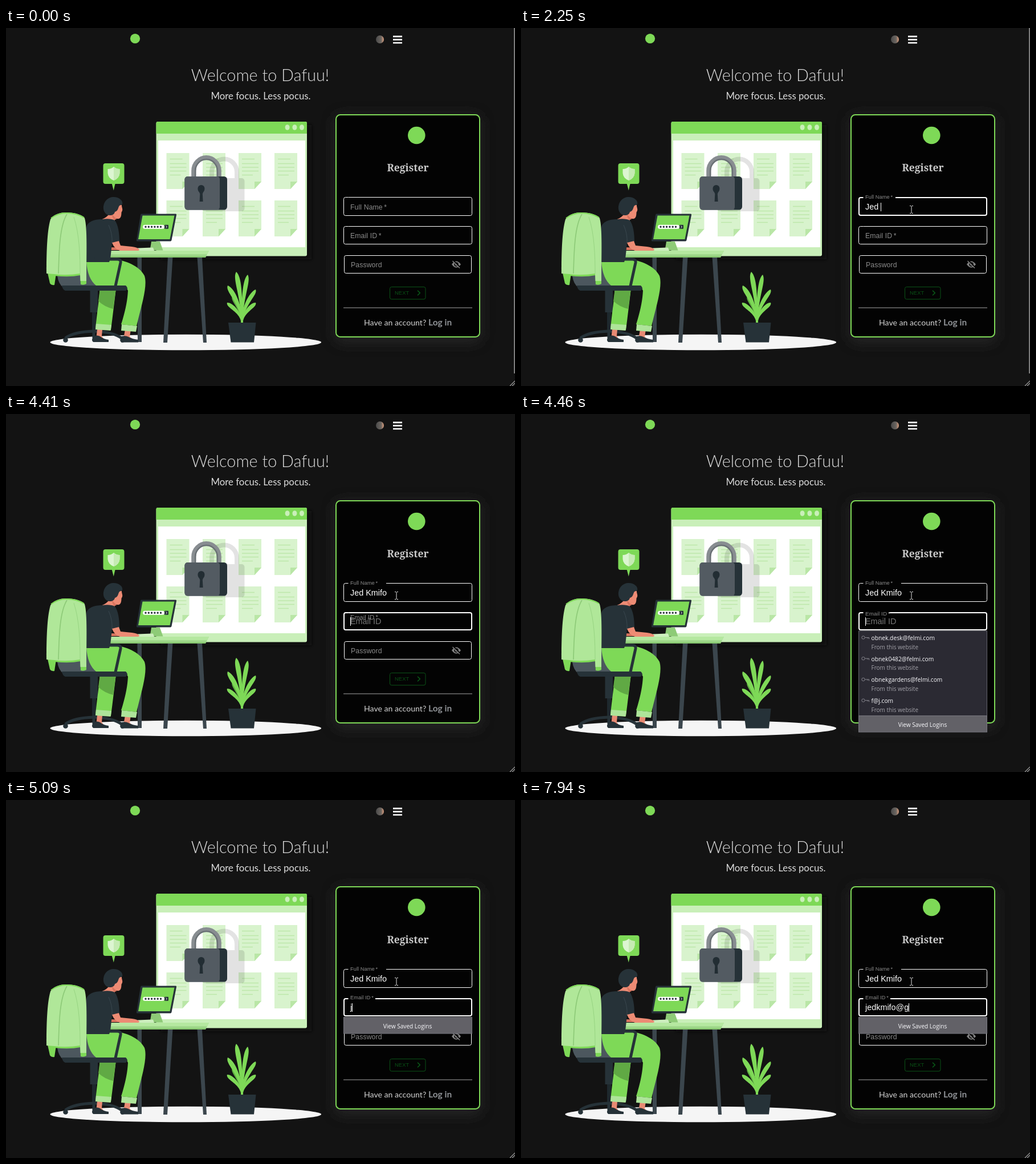
An HTML page that plays this animation: 893 px wide and 627 px high, repeating every 8 s.

```html
<!DOCTYPE html>
<html lang="en">
<head>
<meta charset="utf-8">
<title>Register</title>
<style>
html, body { margin: 0; width: 100%; height: 100%; overflow: hidden; background: #131313; }
svg { display: block; }
text { white-space: pre; }
.lato { font-family: Lato, sans-serif; }
.ui { font-family: "Open Sans", "Noto Sans", sans-serif; }
.arial { font-family: "Liberation Sans", Arial, sans-serif; }
.label { font-size: 12.24px; letter-spacing: .115px; fill: #8c8c8c; }
.typed { font-size: 14.4px; fill: #fff; }
</style>
</head>
<body>
<svg width="893" height="627" viewBox="0 0 893 627" xmlns="http://www.w3.org/2000/svg">
<defs>
  <linearGradient id="moon">
    <stop offset="0" stop-color="#4a4a4a"/><stop offset=".65" stop-color="#6b6661"/><stop offset="1" stop-color="#e0a080"/>
  </linearGradient>
  <filter id="glow" x="-20%" y="-20%" width="140%" height="140%"><feGaussianBlur stdDeviation="11"/></filter>
  <filter id="soft" x="-10%" y="-10%" width="120%" height="120%"><feGaussianBlur stdDeviation="3"/></filter>
</defs>
<rect width="893" height="627" fill="#131313"/>

<!-- header -->
<circle cx="226.5" cy="18.5" r="8.6" fill="#7ed957"/>
<circle cx="656" cy="20" r="7" fill="url(#moon)"/>
<path d="M679 14.800h16M679 20.400h16M679 26h16" stroke="#fff" stroke-width="2.7"/>
<g class="lato" text-anchor="middle" fill="#dcdcdc">
  <text x="446" y="93" font-size="28.8" font-weight="300">Welcome to Dafuu!</text>
  <text x="447" y="124.5" font-size="16.8">More focus. Less pocus.</text>
</g>

<ellipse cx="315.3" cy="550.5" rx="237.8" ry="13.8" fill="#f5f5f5"/>

<!-- browser window -->
<rect x="272" y="170" width="264" height="235" fill="#080808" filter="url(#soft)"/>
<rect x="263.5" y="164" width="264.5" height="235.5" rx="3" fill="#c9efb9"/>
<path d="M263.5 185v-18q0-3 3-3h258.500q3 0 3 3v18z" fill="#7ed957"/>
<g fill="#c9efb9">
  <ellipse cx="493.6" cy="174" rx="4" ry="4.8"/><ellipse cx="506.4" cy="174" rx="4" ry="4.8"/><ellipse cx="519" cy="174" rx="4" ry="4.8"/>
</g>
<rect x="267" y="197" width="258" height="187" fill="#fff"/>
<g id="docs"></g>

<!-- padlock -->
<g opacity=".11">
  <path d="M361 263V252A21.500 22 0 0 1 405 252V263" fill="none" stroke="#000" stroke-width="8"/>
  <rect x="344" y="263" width="74.500" height="58" rx="5"/>
</g>
<path d="M329.200 261V250A22.300 23 0 0 1 373.800 250V261" fill="none" stroke="#888d91" stroke-width="8"/>
<path d="M332.200 261V250A19.300 20 0 0 1 370.800 250V261" fill="none" stroke="#6a7175" stroke-width="2.500"/>
<rect x="313.500" y="260" width="74.500" height="58.500" rx="5.500" fill="#263238"/>
<path d="M319 260H370q5 0 5 5v48q0 5.500-5 5.500H319q-5.500 0-5.500-5.500v-47.500q0-5.500 5.500-5.500z" fill="#535b62"/>
<path d="M342.500 275c7 0 7.500 9 3.500 12.500l-1.200 3 .8 13.500h-6l.7-13.500-1.300-3c-4-3.500-3.500-12.500 3.500-12.500z" fill="#222d33"/>

<!-- shield bubble -->
<path d="M174.500 237h29q4 0 4 4v28q0 4-4 4h-12l-2.700 11.500-3-11.500h-11.300q-4 0-4-4v-28q0-4 4-4z" fill="#7ed957"/>
<path d="M189 243q4.500 4 10.500 4v7q-.5 9-10.500 13q-10-4-10.500-13v-7q6 0 10.500-4z" fill="#dcf5d1"/>
<path d="M189 243q4.500 4 10.500 4v7q-.5 9-10.500 13z" fill="#c5ebb3"/>

<!-- plant -->
<g id="plant"></g>
<path d="M390 516h48.500l-3.500 34.500h-40.500z" fill="#263238"/>

<!-- desk -->
<g fill="#3b464d">
  <path d="M230.500 400h7.500v150h-7z"/>
  <path d="M284 401h8.500L283 551h-7z"/>
  <path d="M335.500 401h8.500l8 150h-6z"/>
</g>
<path d="M150 390h206l-6 12H150z" fill="#a0d98b"/>
<path d="M150 390h206l-3 6H150z" fill="#b5e8a0"/>
<path d="M150 399.500h201l-1 2.500H150z" fill="#88c871"/>
<path d="M255 374h15l5.500 15.500h-23z" fill="#8ecb77"/>
<path d="M231 385.500l27-1 2 5.500h-32z" fill="#cdeebe"/>
<path d="M237.500 325.500h60q2 0 1.500 2l-8.500 44q-.5 2-2 2h-58q-2 0-1.500-2l7-44q.5-2 1.500-2z" fill="#263238"/>
<path d="M239.500 328.500h56l-8 41.500h-55.500z" fill="#7ed957"/>
<path d="M243.500 348.300h31" stroke="#fff" stroke-width="7" stroke-linecap="round"/>
<path d="M245 348.300h28" stroke="#263238" stroke-width="3.400" stroke-linecap="round" stroke-dasharray="0 5.300"/>
<rect x="278" y="344.800" width="7" height="7" rx="1" fill="#263238"/>
<path d="M280.500 346.500l2 1.800-2 1.800" fill="none" stroke="#fff" stroke-width=".9"/>

<!-- chair base -->
<path d="M147.500 460h13.500v38h-13.500z" fill="#263238"/>
<path d="M151 498h7v34h-7z" fill="#1e282d"/>
<path d="M104 543q16-11 50-12q34 1 50 13M154 531v12" fill="none" stroke="#263238" stroke-width="5"/>
<g fill="#263238"><circle cx="104.500" cy="546.500" r="4.300"/><circle cx="204.500" cy="546.500" r="4.300"/><circle cx="155" cy="546" r="4"/></g>

<!-- legs -->
<path d="M160 528h9l-1 12 4 5h-14z" fill="#e88a73"/>
<path d="M153 540q7-3 12 0q6 5 15 6v4h-27z" fill="#263238"/>
<path d="M165 456h28c-3 25-6 50-9 73l-27-2c2-24 6-48 8-71z" fill="#7ed957"/>
<path d="M165 456h28l-5 36q-16-4-26-14z" fill="#60a944"/>
<path d="M158 518l27 2-1.500 10-26.500-2z" fill="#aee49a"/>
<path d="M209 528h10l-2 13 5 4h-16z" fill="#e88a73"/>
<path d="M202 540q8-2 13 1q7 4 17 5v4.500h-30z" fill="#263238"/>
<path d="M90 434l55-26 14 46H100q-8-6-10-20z" fill="#4c575e"/>
<path d="M141 409l48-4c20 2 45 11 54 29c6 18-6 54-14 88l-27-3c7-22 11-40 12-59l-5-9h-51q-15-12-17-42z" fill="#7ed957"/>
<path d="M98 451h112q6 5 0 9H104q-5-2-6-9z" fill="#263238"/>
<path d="M203 519l27 3-2 10-26-2z" fill="#aee49a"/>

<!-- person -->
<path d="M181 320l19-11l3 1c0 5 2 6 1 10l-1.500 3c0 8-2 12-8 11l-3-.5-1 4-23-2q10-4 13.500-10z" fill="#ed8b74"/>
<path d="M186 326l8 9-4 1q-4-4-4-10z" fill="#d9745f"/>
<path d="M171 317c-1-13 8-21 18-21c9 0 17 6 15 13l-5 2c-3 5-2 9-8 11c-1 4-4 6-9 6c-6 0-10-5-11-11z" fill="#263238"/>
<path d="M180 384l38 1q7 2 10 4h-46z" fill="#d9745f"/>
<path d="M141 349c2-10 14-14 27-14q16-2 23 2c6 8 8 23 8 37l-13 3c-1 9-2 19-3 27l-2 6h-40c-1-20-2-42 0-61z" fill="#263238"/>
<path d="M180 345q7 15 6 32" fill="none" stroke="#39474e" stroke-width="1"/>
<path d="M186 376l12-3 3 8 20 2q10 1 13 5q0 2-4 2h-30q-10-3-14-14z" fill="#ed8b74"/>
<path d="M157 405h38q7 0 6 6l-9 41" fill="none" stroke="#263238" stroke-width="5" stroke-linecap="round"/>

<!-- jacket on the chair -->
<path d="M73 429l15 1-3 20q-5 1-8-3z" fill="#7ed957"/>
<path d="M85 429h46v4q-20 4-46 1z" fill="#7ed957"/>
<path d="M130 428h11v20q-5 3-10 1z" fill="#7ed957"/>
<path d="M78 335c6-9 17-12 28-12c14 0 28 4 32 10c5 17 3 65 3 110h-10.500l-.5-13q-24 4-45 1l-14-1c0-35 1-75 7-95z" fill="#b0e799"/>
<path d="M79 333q12-9 27-9q18 0 31 8" fill="none" stroke="#7ed957" stroke-width="2"/>
<path d="M107 326c-13 20-14 66-15 104" fill="none" stroke="#8cc977" stroke-width="1.600"/>
<path d="M119 331c10 30 11 70 11 99" fill="none" stroke="#97d482" stroke-width="1"/>

<!-- card -->
<rect x="576" y="152" width="258" height="400" rx="14" fill="#2c2c2c" opacity=".75" filter="url(#glow)"/>
<rect x="579" y="152" width="252" height="389" rx="7.500" fill="#030303" stroke="#7ed957" stroke-width="2"/>
<circle cx="720.300" cy="188" r="15.300" fill="#7ed957"/>
<text x="705" y="251" text-anchor="middle" font-family="'Noto Serif', serif" font-weight="700" font-size="17.500" fill="#c9c9c9">Register</text>
<g id="fields"></g>
<rect x="593.500" y="398.500" width="223" height="31" rx="3" fill="none" stroke="#fff"/>
<text class="arial label" x="605" y="418.500">Password</text>
<path d="M782 414q8-11 16 0q-8 11-16 0z" fill="#828282"/>
<circle cx="790" cy="414" r="3.700" fill="#030303"/><circle cx="790" cy="414" r="2.200" fill="#828282"/>
<path d="M784.500 407l12.500 12.500" stroke="#030303" stroke-width="2"/>
<path d="M783.500 408l12.500 12.500" stroke="#828282" stroke-width="1.500"/>
<rect x="673.500" y="453.500" width="62.500" height="21.500" rx="3" fill="none" stroke="#0a5216"/>
<text class="arial" x="682" y="467.300" font-size="9.200" letter-spacing=".2" fill="#0a5216">NEXT</text>
<path d="M722 459.700l4.300 4.300-4.300 4.300" fill="none" stroke="#0a5a18" stroke-width="1.600"/>
<path d="M592 490h226" stroke="#a5a5a5"/>
<g class="lato">
  <text x="628" y="521" font-size="14.100" fill="#d4d4d4">Have an account?</text>
  <text x="741" y="521" font-size="15.500" font-weight="700" fill="#8f9296">Log in</text>
</g>

<!-- saved logins -->
<g id="list" class="ui">
  <rect x="592.500" y="380" width="225" height="149" fill="#2b2a33" stroke="#62626c"/>
  <g id="logins"></g>
</g>
<g id="foot" class="ui">
  <rect x="592.500" y="528.500" width="225" height="28.500" fill="#626167" stroke="#77767e"/>
  <text x="704.500" y="547.500" font-size="10.100" text-anchor="middle" fill="#fbfbfe">View Saved Logins</text>
</g>

<rect id="bar" x="891" width="2" height="605" fill="#7c7c7c"/>
<path d="M884 627l9-9M888 627l5-5" stroke="#a0a0a0" stroke-width="1.200"/>

<circle id="halo" cx="683" cy="317" r="13" fill="#ff0" opacity=".5"/>
<g id="mouse">
  <path id="beam" d="M-3-6.500h2l1 1 1-1h2M0-5.500v11M-3 6.500h2l1-1 1 1h2" fill="none" stroke="#e4e4e4"/>
  <path id="arrow" d="M0 0v14.500l3.500-3 2.500 5.500 2.200-1-2.500-5.300h4.500z" fill="#fff" stroke="#000" stroke-width=".8"/>
</g>
</svg>
<script>
const $ = id => document.getElementById(id);
const clamp = v => Math.max(0, Math.min(1, v));
const LOOP = 8000;

// documents in the window
let html = '';
for (const y of [219, 302]) for (const x of [281.5, 345, 408, 471]) {
  html += `<path d="M${x} ${y}h40v50l-12 13h-28z" fill="#d8f3cd"/>
    <path d="M${x + 40} ${y + 50}l-12 13v-13z" fill="#b9e6a6"/>
    <path d="M${x + 6} ${y + 10.5}h22m-22 8h29m-29 6.500h29m-29 6.500h29m-29 7h19" stroke="#bde8aa" stroke-width="1.300" fill="none"/>`;
}
$('docs').innerHTML = html;

// plant leaves rise from one base and bend outwards: tip x, tip y, width, colour
const leaf = (tx, ty, w, fill) => {
  const bx = 414, by = 516, dx = tx - bx, dy = ty - by, len = Math.hypot(dx, dy);
  const nx = -dy / len, ny = dx / len;
  const side = o => `${tx - dx * .12 + nx * o} ${ty - dy * .12 + ny * o}`;
  const low = o => `${bx + dx * .08 + o} ${by + dy * .55}`;
  return `<path d="M${bx + 1.5} ${by}C${low(1)} ${side(w)} ${tx} ${ty}C${side(-w)} ${low(-1)} ${bx - 1.5} ${by}z" fill="${fill}"/>`;
};
const dark = '#5fae42', green = '#7ed957';
$('plant').innerHTML = [
  [397, 470, 7, dark], [431, 468, 7, dark], [404, 427, 9, green], [424, 432, 8, green],
  [389, 451, 9, green], [438, 458, 8, green], [388, 481, 8, green], [438, 481, 8, green]
].map(a => leaf(...a)).join('');

// saved login rows
$('logins').innerHTML = ['obnek.desk@felmi.com', 'obnek0482@felmi.com', 'obnekgardens@felmi.com', 'f@j.com']
  .map((mail, i) => `<g transform="translate(0 ${i * 36.7})">
    <path d="M603.500 391.500h7v2.500m-2.500-2.500v2" fill="none" stroke="#85848c"/>
    <circle cx="600.500" cy="391.500" r="2.700" fill="none" stroke="#85848c"/>
    <text x="614.500" y="396" font-size="10.250" fill="#fbfbfe">${mail}</text>
    <text x="614.500" y="411.700" font-size="10" fill="#a3a2a9">From this website</text></g>`).join('');

// keystrokes: time, field value
const spell = (word, times) => times.map((t, i) => [t, word.slice(0, i + 1)]);
const fields = [
  { y: 296, base: 318, name: 'Full Name', from: 740, to: 4380, gap: 657, rest: 667, off: [1230, 1530],
    keys: [...spell('Jed K', [1530, 1780, 2030, 2250, 2530]), [2750, 'Jed Kn'], [3220, 'Jed K'],
      [3480, 'Jed Km'], [3740, 'Jed Kmi'], [3960, 'Jed Kmif'], [4210, 'Jed Kmifo']] },
  { y: 347, base: 368, name: 'Email ID', from: 4380, to: LOOP, gap: 648, rest: 657, off: [5450, 5620],
    keys: [[4920, 'j'], [5290, 'jp'], [5620, 'j'],
      ...spell('jedkmifo@g', [4920, 5870, 6010, 6280, 6450, 6620, 6820, 6980, 7530, 7940]).slice(1)] }
];
$('fields').innerHTML = fields.map((f, i) => `<path id="box${i}" fill="none" stroke="#fff"/>
  <text id="hint${i}" class="arial typed" x="604" y="${f.base}">${f.name}</text>
  <text id="label${i}" class="arial label">${f.name}\u2009*</text>
  <text id="value${i}" class="arial typed" x="604" y="${f.base}"></text>
  <rect id="caret${i}" y="${f.base - 12}" width="1" height="15" fill="#fff"/>`).join('');

const pen = document.createElement('canvas').getContext('2d');
pen.font = '14.4px "Liberation Sans", Arial, sans-serif';

// cubic-bezier(0, 0, .2, 1)
const easeOut = x => {
  let lo = 0, hi = 1;
  for (let i = 0; i < 20; i++) {
    const s = (lo + hi) / 2;
    if (.6 * (1 - s) * s * s + s ** 3 < x) lo = s; else hi = s;
  }
  return 3 * (1 - lo) * lo * lo + lo ** 3;
};
const show = (id, on) => $(id).setAttribute('visibility', on ? 'visible' : 'hidden');

function drawField(f, i, t) {
  const focus = t >= f.from && t < f.to;
  const p = easeOut(clamp((t - f.from) / 200));
  const open = easeOut(clamp((t - f.from - 40) / 60));
  const w = focus ? 2 : 1, e = w / 2;
  const l = 592 + e, r = 818 - e, top = f.y + e, bottom = f.base + 11 - e;
  const end = 600.5 + ((focus ? f.gap : f.rest) - 600.5) * open;
  const box = $('box' + i);
  box.setAttribute('d', `M${end} ${top}H${r - 3}Q${r} ${top} ${r} ${top + 3}V${bottom - 3}Q${r} ${bottom} ${r - 3} ${bottom}` +
    `H${l + 3}Q${l} ${bottom} ${l} ${bottom - 3}V${top + 3}Q${l} ${top} ${l + 3} ${top}H600.5`);
  box.setAttribute('stroke-width', w);
  $('label' + i).setAttribute('transform', `translate(604 ${f.base - 19.5 * p}) scale(${1 - .25 * p})`);

  let value = '';
  for (const [at, s] of f.keys) if (t >= at) value = s;
  $('value' + i).textContent = value;
  $('hint' + i).setAttribute('opacity', focus && !value ? .46 * clamp((t - f.from + 30) / 60) : 0);
  $('caret' + i).setAttribute('x', 604 + Math.round(pen.measureText(value).width));
  show('caret' + i, focus && !(t >= f.off[0] && t < f.off[1]));
}

function draw(t) {
  fields.forEach((f, i) => drawField(f, i, t));

  const k = clamp((t - 290) / 380), m = k * k * (3 - 2 * k);
  const x = 712 - 27 * m, y = 469 - 151 * m;
  const inField = [297, 347, 398].some(top => y > top && y < top + 32);
  $('mouse').setAttribute('transform', `translate(${Math.round(x)} ${Math.round(y)})`);
  show('beam', t >= 290 && inField);
  show('arrow', t >= 290 && !inField);
  show('halo', t >= 710 && t < 860);

  show('list', t >= 4450 && t < 4990);
  show('foot', t >= 4450);
  $('foot').setAttribute('transform', `translate(0 ${t < 4990 ? 0 : -148})`);
  $('bar').setAttribute('opacity', 1 - clamp((t - 3250) / 290));
}

const start = performance.now();
function tick() {
  draw((performance.now() - start) % LOOP);
  requestAnimationFrame(tick);
}
draw(0);
requestAnimationFrame(tick);
</script>
</body>
</html>
```
